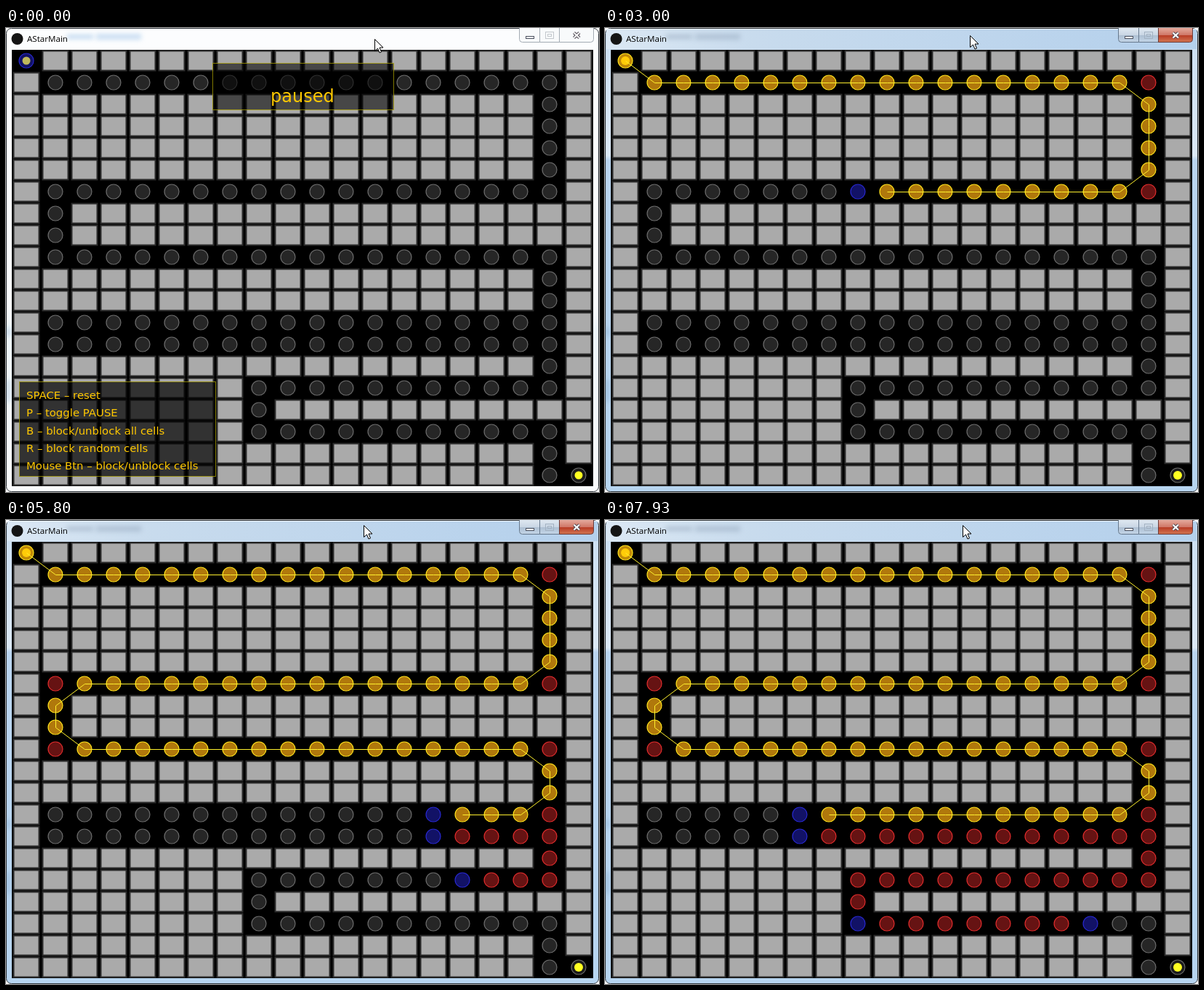
Recreate the animation shown at these times as an HTML page with a canvas. Size 816x638 px, loop 8 s.

```html
<!DOCTYPE html>
<html lang="en">
<head>
<meta charset="utf-8">
<title>A* search</title>
<style>
html, body { margin: 0; width: 100%; height: 100%; overflow: hidden; background: #fff; }
canvas { display: block; }
</style>
</head>
<body>
<canvas id="stage" width="816" height="638"></canvas>
<script>
const ctx = document.getElementById('stage').getContext('2d');
const LOOP = 8000, TICK = 1000 / 15, START_TIME = 930;
const SIZE = 20, CELL_W = 40, CELL_H = 30, GOAL = SIZE * SIZE - 1;

// Open corridors as [row, first column, last column]
const open = new Set();
const corridors = [
  [0, 0, 0], [1, 1, 18], [2, 18, 18], [3, 18, 18], [4, 18, 18], [5, 18, 18],
  [6, 1, 18], [7, 1, 1], [8, 1, 1], [9, 1, 18], [10, 18, 18], [11, 18, 18],
  [12, 1, 18], [13, 1, 18], [14, 18, 18], [15, 8, 18], [16, 8, 8],
  [17, 8, 18], [18, 18, 18], [19, 18, 19]
];
for (const [row, first, last] of corridors)
  for (let col = first; col <= last; col++) open.add(row * SIZE + col);

const colOf = id => id % SIZE, rowOf = id => Math.floor(id / SIZE);
const centre = id => [28 + colOf(id) * CELL_W, 45 + rowOf(id) * CELL_H];
const distance = (a, b) =>
  Math.hypot((colOf(a) - colOf(b)) * CELL_W, (rowOf(a) - rowOf(b)) * CELL_H);

function neighbours(id) {
  return [...open].filter(other => other !== id &&
    Math.abs(colOf(other) - colOf(id)) < 2 && Math.abs(rowOf(other) - rowOf(id)) < 2);
}
const links = new Map([...open].map(id => [id, neighbours(id)]));

// A* after a given number of expansions
function search(steps) {
  const cost = new Map([[0, 0]]), parent = new Map();
  const frontier = new Set([0]), closed = new Set(), path = [];
  const score = id => cost.get(id) + distance(id, GOAL);
  let current;
  for (let i = 0; i < steps; i++) {
    current = [...frontier].reduce((a, b) => score(b) < score(a) ? b : a);
    frontier.delete(current);
    closed.add(current);
    for (const next of links.get(current)) {
      const g = cost.get(current) + distance(current, next);
      if (closed.has(next) || g >= (cost.get(next) ?? Infinity)) continue;
      cost.set(next, g);
      parent.set(next, current);
      frontier.add(next);
    }
  }
  for (; current !== undefined; current = parent.get(current)) path.push(current);
  return { frontier, closed, path };
}

function rect(x, y, w, h, fill) {
  ctx.fillStyle = fill;
  ctx.fillRect(x, y, w, h);
}
function disc([x, y], r, fill, stroke) {
  ctx.beginPath();
  ctx.arc(x, y, r, 0, Math.PI * 2);
  ctx.fillStyle = fill;
  ctx.fill();
  if (!stroke) return;
  ctx.strokeStyle = stroke;
  ctx.lineWidth = 1.2;
  ctx.stroke();
}
function polyline(points, stroke, width = 1) {
  ctx.beginPath();
  points.forEach(([x, y]) => ctx.lineTo(x, y));
  ctx.strokeStyle = stroke;
  ctx.lineWidth = width;
  ctx.stroke();
}
function label(text, x, y, font, fill) {
  ctx.font = font;
  ctx.fillStyle = fill;
  ctx.fillText(text, x, y);
}
function gradient(x, y, stops) {
  const g = ctx.createLinearGradient(0, 0, x, y);
  stops.forEach(([at, colour]) => g.addColorStop(at, colour));
  return g;
}
function roundRect(x, y, w, h, radii, fill, stroke) {
  ctx.beginPath();
  ctx.roundRect(x, y, w, h, radii);
  ctx.fillStyle = fill;
  ctx.fill();
  ctx.strokeStyle = stroke;
  ctx.lineWidth = 1;
  ctx.stroke();
}

function drawButtons(active) {
  const edge = active ? '#66788c' : '#a3abb3';
  const plain = active
    ? gradient(0, 20, [[0, '#dfe8f1'], [.48, '#c9d6e4'], [.5, '#adbfd2'], [1, '#c5d7e9']])
    : '#f8fafb';
  const close = active
    ? gradient(0, 20, [[0, '#e5aa9d'], [.48, '#cf7767'], [.5, '#b83a24'], [1, '#d47a55']])
    : '#f8fafb';
  roundRect(706.5, -1, 28, 20.5, [0, 0, 0, 4], plain, edge);
  roundRect(734.5, -1, 27, 20.5, 0, plain, edge);
  roundRect(761.5, -1, 47, 20.5, [0, 0, 4, 0], close, active ? '#6b3a38' : edge);
  ctx.lineWidth = 1;
  ctx.fillStyle = active ? '#fff' : '#fafafa';
  ctx.strokeStyle = '#4c5260';
  ctx.fillRect(715, 11, 12, 4);
  ctx.strokeRect(715.5, 11.5, 11, 3);
  ctx.strokeStyle = active ? '#a3b2c2' : '#c3c8cd';
  ctx.strokeRect(742.5, 5.5, 11, 9);
  ctx.strokeRect(745.5, 8.5, 5, 3);
  for (const [colour, width] of [['#4c4650', 4.2], [active ? '#fff' : '#f6f6f6', 2.2]]) {
    polyline([[781.5, 6.5], [789, 13.5]], colour, width);
    polyline([[789, 6.5], [781.5, 13.5]], colour, width);
  }
}

function drawWindow(active) {
  const glass = active
    ? gradient(0, 638, [[0, '#cbdff2'], [.275, '#dce9f6'], [.285, '#bad5f0'], [1, '#b7d5f0']])
    : gradient(0, 638, [[0, '#fcfdfe'], [.6, '#fbfdfe'], [.65, '#edf5fb'], [1, '#fafcfd']]);
  roundRect(.5, .5, 815, 637, 7, glass, '#343a40');
  if (active) {
    rect(2, 2, 812, 27, gradient(816, 0, [[0, '#dbe8f4'], [.25, '#c8dbed'], [1, '#b4d0ec']]));
    rect(2, 1, 812, 1, '#eff6fc');
  }
  ctx.save();
  ctx.filter = 'blur(3px)';
  rect(84, 9, 36, 6, active ? '#8b9fb477' : '#83b5e477');
  rect(124, 8, 62, 8, active ? '#8b9fb466' : '#83b5e466');
  rect(1, 412, 4, 12, '#6a93bb66');
  rect(1, 484, 4, 30, '#6a93bb66');
  ctx.restore();
  disc([15.5, 15], 8, '#141414');
  label('AStarMain', 29, 19, '11.6px "Open Sans", sans-serif', '#000');
  drawButtons(active);
}

function drawCells({ frontier, closed, path }, running) {
  const onPath = new Set(path);
  rect(8, 30, 800, 600, '#000');
  for (let id = 0; id <= GOAL; id++) {
    const [x, y] = centre(id);
    if (!open.has(id)) {
      rect(x - 18.5, y - 14.5, 37, 29, '#2c2c2c');
      rect(x - 16.5, y - 12.5, 33, 25, '#aaa');
    } else if (onPath.has(id)) disc([x, y], 10, id ? '#b0780c' : '#c08a08', '#ffe21c');
    else if (closed.has(id)) disc([x, y], 10, '#661313', '#e02c2c');
    else if (frontier.has(id)) disc([x, y], 10, '#121266', '#2828d0');
    else disc([x, y], 10, id === GOAL ? '#1c1c1c' : '#262626', '#6c6c6c');
  }
  disc(centre(0), running ? 6 : 5.5, running ? '#ffcc08' : '#bfb85c');
  disc(centre(GOAL), running ? 6 : 5.5, '#ffff22');
  if (path.length > 1)
    polyline(path.map(id => centre(id).map(v => v + .5)), '#fff12e');
}

function drawPanel(x, y, w, h, alpha) {
  rect(x, y, w, h, `rgba(0,0,0,${alpha})`);
  ctx.strokeStyle = 'rgba(255,240,0,.5)';
  ctx.lineWidth = 1;
  ctx.strokeRect(x + .5, y + .5, w - 1, h - 1);
}

function drawOverlays() {
  const family = '"DejaVu Sans", sans-serif', gold = '#ffc800';
  drawPanel(284, 48, 250, 65, .58);
  label('paused', 364, 102, '24px ' + family, gold);
  drawPanel(18, 486, 271, 131, .7);
  ['SPACE – reset', 'P – toggle PAUSE', 'B – block/unblock all cells',
    'R – block random cells', 'Mouse Btn – block/unblock cells']
    .forEach((line, i) => label(line, 28, 510 + i * 24.3, '14.9px ' + family, gold));
}

// Pointer keys as [time, x, y]
const pointerKeys = [[1800, 508, 15], [2130, 505, 12], [2670, 505, 12],
  [3470, 500, 7], [3800, 493, 7]];
function pointerAt(t) {
  const next = pointerKeys.findIndex(key => key[0] > t);
  if (next === 0) return pointerKeys[0].slice(1);
  if (next < 0) return pointerKeys.at(-1).slice(1);
  const a = pointerKeys[next - 1], b = pointerKeys[next];
  const p = (t - a[0]) / (b[0] - a[0]);
  return [1, 2].map(i => Math.round(a[i] + (b[i] - a[i]) * p));
}
function drawPointer([x, y]) {
  ctx.save();
  ctx.translate(x - .5, y + .5);
  ctx.beginPath();
  for (const [px, py] of [[0, 0], [0, 16], [4, 12.5], [6.5, 18.5], [9, 17.5], [6.5, 11.5], [11.5, 11.5]])
    ctx.lineTo(px, py);
  ctx.closePath();
  ctx.fillStyle = '#fff';
  ctx.fill();
  ctx.strokeStyle = '#000';
  ctx.lineWidth = 1;
  ctx.stroke();
  ctx.restore();
}

function draw(t) {
  const running = t >= START_TIME;
  const steps = running ? Math.floor((t + 4) / TICK) - 12 : 0;
  rect(0, 0, 816, 638, '#fff');
  drawWindow(t >= 330);
  if (t >= 270 && t < 330) {
    ctx.globalAlpha = .5;
    drawWindow(true);
    ctx.globalAlpha = 1;
  }
  drawCells(search(steps), running);
  if (!running) drawOverlays();
  drawPointer(pointerAt(t));
}

const begin = performance.now();
function frame() {
  draw((performance.now() - begin) % LOOP);
  requestAnimationFrame(frame);
}
frame();
</script>
</body>
</html>
```
